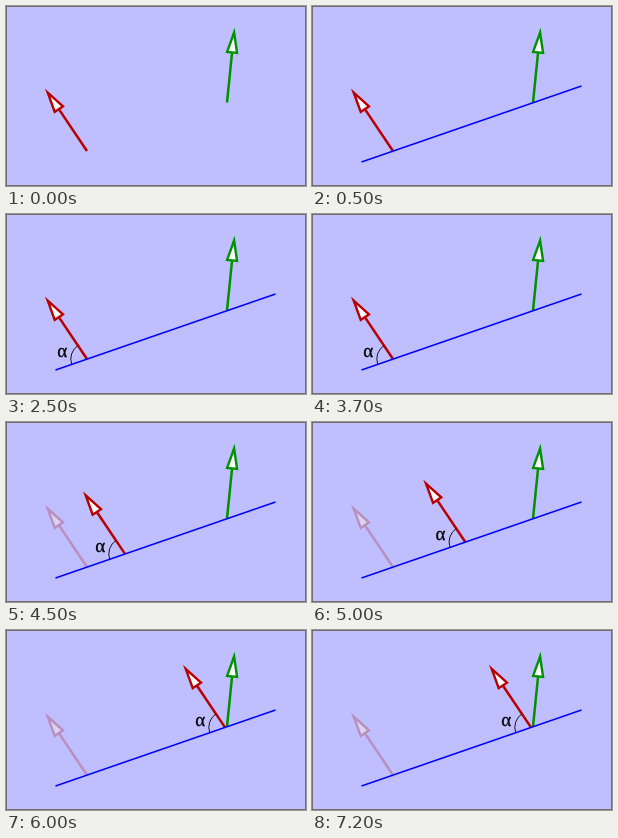
Animation, 300 px wide and 180 px high, one loop 8000 ms. Source, as an HTML page with a canvas:

```html
<!DOCTYPE html>
<html lang="en">
<head>
<meta charset="utf-8">
<title>Parallel transport of a vector</title>
<style>
html, body { margin: 0; width: 100%; height: 100%; overflow: hidden; }
canvas { display: block; width: 300px; height: 180px; }
</style>
</head>
<body>
<canvas id="stage" width="300" height="180"></canvas>
<script>
const ctx = document.getElementById('stage').getContext('2d');
const LOOP = 8000;
const RED = '#b80000', GREEN = '#009200';
const START = [81, 145], SLOPE = -76 / 220;
const SHIFTS = [38, 72.3, 105, 138];

function line(x1, y1, x2, y2, color, width) {
  ctx.strokeStyle = color;
  ctx.lineWidth = width;
  ctx.beginPath();
  ctx.moveTo(x1, y1);
  ctx.lineTo(x2, y2);
  ctx.stroke();
}

// Shaft along +x with a hollow triangular head, rotated into place.
function arrow(x, y, dx, dy, color, fill = '#fff') {
  const length = Math.hypot(dx, dy), neck = length - 20;
  ctx.save();
  ctx.translate(x, y);
  ctx.rotate(Math.atan2(dy, dx));
  line(0, 0, neck, 0, color, 2.5);
  ctx.lineWidth = 2.4;
  ctx.fillStyle = fill;
  ctx.beginPath();
  ctx.moveTo(neck, -5);
  ctx.lineTo(length, 0);
  ctx.lineTo(neck, 5);
  ctx.closePath();
  ctx.fill();
  ctx.stroke();
  ctx.restore();
}

function angleMark(x, y) {
  ctx.strokeStyle = '#000';
  ctx.lineWidth = 0.9;
  ctx.beginPath();
  ctx.arc(x, y, 16.2, Math.atan2(76, -220), Math.atan2(-58.5, -39.3));
  ctx.stroke();
  ctx.fillStyle = '#000';
  ctx.font = '19px "Liberation Serif", serif';
  ctx.lineWidth = 0.3;
  ctx.fillText('α', x - 29.7, y - 1.6);
  ctx.strokeText('α', x - 29.7, y - 1.6);
}

function draw(t) {
  const step = t < 4500 ? -1 : Math.min(3, Math.floor((t - 4500) / 500));
  const shift = step < 0 ? 0 : SHIFTS[step];
  const x = START[0] + shift, y = START[1] + shift * SLOPE;

  ctx.fillStyle = '#bfbfff';
  ctx.fillRect(0, 0, 300, 180);
  ctx.strokeStyle = '#707070';
  ctx.lineWidth = 1;
  ctx.strokeRect(0.5, 0.5, 299, 179);

  if (step >= 0) arrow(...START, -39.3, -58.5, '#b98fc0', '#dad2ef');
  arrow(221, 96.5, 7.1, -70, GREEN);
  arrow(x, y, -39.3, -58.5, RED);
  if (t >= 500) line(49.5, 156, 269.5, 80, '#0000ff', 1.35);
  if (t >= 2500) angleMark(x, y);
}

function tick() {
  draw(performance.now() % LOOP);
  requestAnimationFrame(tick);
}
tick();
</script>
</body>
</html>
```
